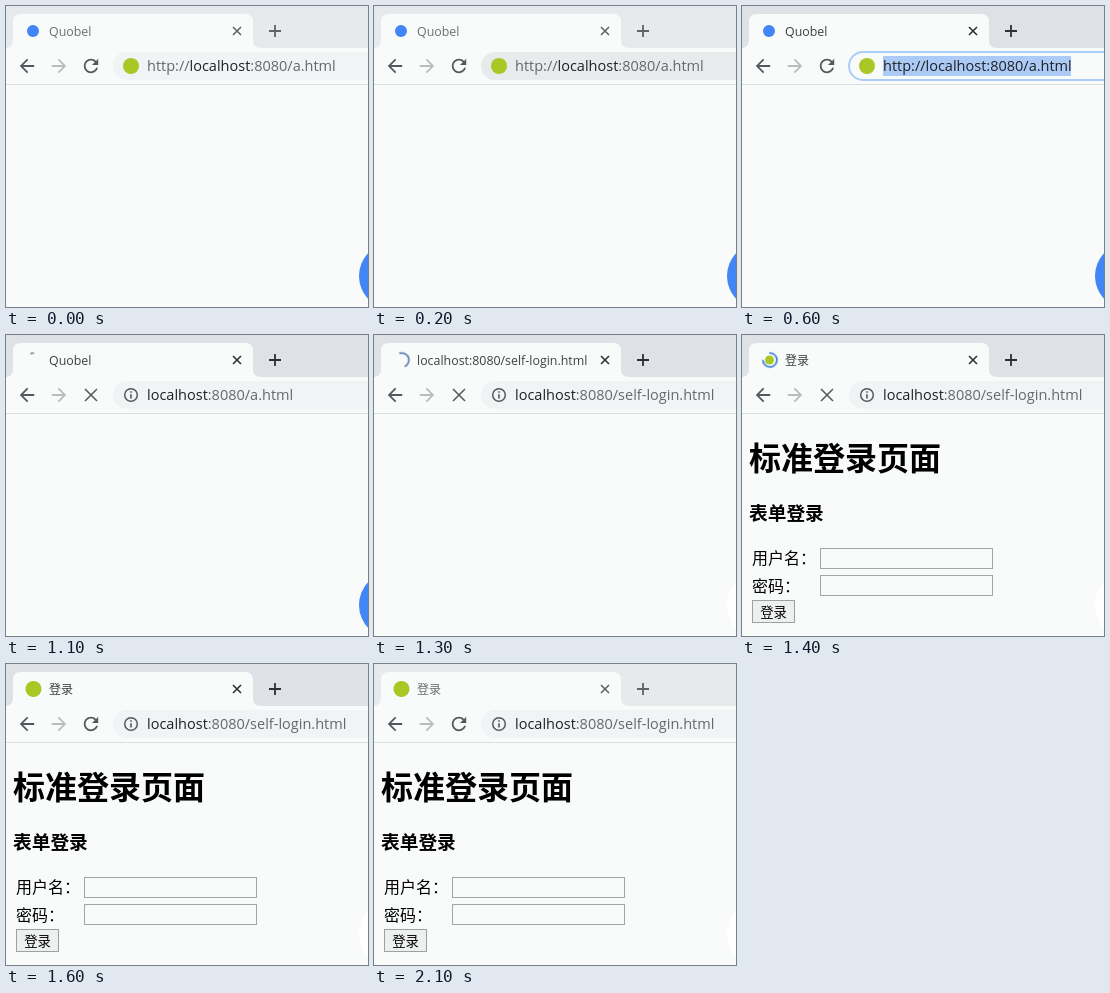
Animation, 362 px wide and 301 px high, one loop 2.9 s. Source, as an HTML page:

```html
<!DOCTYPE html>
<html lang="zh-CN">
<head>
<meta charset="utf-8">
<title>登录</title>
<style>
html, body { margin: 0; width: 100%; height: 100%; overflow: hidden; background: #f9fbfb; }
svg { display: block; width: 362px; height: 301px; }
text { font-family: "Open Sans", "Noto Sans CJK SC", "Noto Sans CJK", sans-serif; }
.url { font-size: 14.5px; fill: #64686c; }
.host { fill: #202124; }
.title { font-size: 12.4px; }
.page text { font-family: "Noto Sans CJK SC", "Noto Sans CJK", sans-serif; font-size: 16px; }
.page .h1 { font-size: 32px; font-weight: 700; }
.page .h3 { font-size: 18.72px; font-weight: 700; }
.page .btn { font-size: 13.333px; text-anchor: middle; }
.field { fill: #f9fbfb; stroke: #a3a5a5; }
.line { fill: none; stroke: #54585c; }

/* every change is a hard cut within one 2900 ms loop */
.strip, .ink, .cross, .pill, .blob, .spin, .leaf, .cut { animation: 2900ms step-end infinite; }
.strip { animation-name: strip; }
.ink { animation-name: ink; }
.cross { animation-name: cross; fill: none; }
.pill { animation-name: pill; stroke-width: 2; }
.blob { animation-name: blob; }
.leaf { animation-name: leaf; fill: #a9c825; }
.wait { animation-name: wait; stroke: #8b8f93; }
.load { animation-name: load; }
.to600 { animation-name: to600; }
.to1100 { animation-name: to1100; }
.to1300 { animation-name: to1300; }
.sel { animation-name: sel; }
.old { animation-name: old; }
.blank { animation-name: blank; }
.busy { animation-name: busy; }
.idle { animation-name: idle; }
.from1100 { animation-name: from1100; }
.from1300 { animation-name: from1300; }
.from1400 { animation-name: from1400; }
.spin { fill: none; stroke-width: 1.8; transform-origin: 28px 25px; }

@keyframes strip { 0%, 72.414%, 100% { fill: #e7eaed } 20.69% { fill: #dee1e6 } }
@keyframes ink { 0%, 72.414%, 100% { fill: #6b6f73 } 20.69% { fill: #3c4043 } }
@keyframes cross { 0%, 72.414%, 100% { stroke: #5f6368 } 20.69% { stroke: #2d3034 } }
@keyframes pill {
  0%, 37.931%, 100% { fill: #f1f3f4; stroke: transparent }
  6.897% { fill: #e8eaeb; stroke: transparent }
  20.69% { fill: #f9fbfb; stroke: #accdf6 }
}
@keyframes blob { 0% { fill: #4285f4 } 44.828%, 100% { fill: #fff } }
@keyframes leaf {
  0% { visibility: hidden; r: 4.5px }
  48.276% { visibility: visible; r: 4.5px }
  55.172%, 100% { visibility: visible; r: 8px }
}
@keyframes wait {
  0%, 44.828%, 100% { visibility: hidden; stroke-dasharray: 30 330 }
  37.931% { visibility: visible; stroke-dasharray: 30 330; transform: rotate(-120deg) }
  41.379% { visibility: visible; stroke-dasharray: 100 260; transform: rotate(-210deg) }
}
@keyframes load {
  0%, 55.172%, 100% { visibility: hidden; stroke: #6688b8 }
  44.828% { visibility: visible; stroke: #6688b8; stroke-dasharray: 180 180; transform: rotate(-112deg) }
  48.276% { visibility: visible; stroke: #4c87d6; stroke-dasharray: 275 85; transform: rotate(-95deg) }
  51.724% { visibility: visible; stroke: #4c87d6; stroke-dasharray: 270 90; transform: rotate(-30deg) }
}
@keyframes to600 { 0% { visibility: visible } 20.69%, 100% { visibility: hidden } }
@keyframes to1100 { 0% { visibility: visible } 37.931%, 100% { visibility: hidden } }
@keyframes to1300 { 0% { visibility: visible } 44.828%, 100% { visibility: hidden } }
@keyframes sel { 0%, 37.931%, 100% { visibility: hidden } 20.69% { visibility: visible } }
@keyframes old { 0%, 44.828%, 100% { visibility: hidden } 37.931% { visibility: visible } }
@keyframes blank { 0%, 48.276%, 100% { visibility: hidden } 44.828% { visibility: visible } }
@keyframes busy { 0%, 55.172%, 100% { visibility: hidden } 37.931% { visibility: visible } }
@keyframes idle { 0%, 55.172%, 100% { visibility: visible } 37.931% { visibility: hidden } }
@keyframes from1100 { 0% { visibility: hidden } 37.931%, 100% { visibility: visible } }
@keyframes from1300 { 0% { visibility: hidden } 44.828%, 100% { visibility: visible } }
@keyframes from1400 { 0% { visibility: hidden } 48.276%, 100% { visibility: visible } }
</style>
</head>
<body>
<svg viewBox="0 0 362 301">
  <defs>
    <path id="arrow" d="M20 11H7.83l5.59-5.59L12 4l-8 8 8 8 1.41-1.41L7.83 13H20z"/>
  </defs>
  <rect width="362" height="301" fill="#f9fbfb"/>

  <!-- tab strip -->
  <rect class="strip" width="362" height="42"/>
  <path d="M-1 42Q7 42 7 34V16Q7 8 15 8H239Q247 8 247 16V34Q247 42 255 42Z" fill="#f9fbfb"/>
  <circle class="cut to1100" cx="27" cy="25" r="6" fill="#4285f4"/>
  <circle class="leaf" cx="27.5" cy="25"/>
  <circle class="spin wait" cx="28" cy="25" r="7" pathLength="360"/>
  <circle class="spin load" cx="28" cy="25" r="7" pathLength="360"/>
  <g class="ink title">
    <text class="cut to1300" x="43" y="30">Quobel</text>
    <text class="cut blank" x="43" y="30">localhost:8080/self-login.html</text>
    <text class="cut from1400" x="43" y="29.6" font-size="12">登录</text>
  </g>
  <path class="cross" stroke-width="1.6" d="M227 21l8 8m0-8l-8 8"/>
  <path class="cross" stroke-width="1.8" d="M263 25h12M269 19v12"/>

  <!-- toolbar -->
  <use href="#arrow" transform="translate(10.2 49.2) scale(.9)" fill="#54585c"/>
  <use href="#arrow" transform="translate(63.8 49.2) scale(-.9 .9)" fill="#babcbe"/>
  <path class="cut idle" transform="translate(74.2 49.2) scale(.9)" fill="#54585c" d="M17.65 6.35C16.2 4.9 14.21 4 12 4c-4.42 0-7.99 3.58-7.99 8s3.57 8 7.99 8c3.73 0 6.84-2.55 7.73-6h-2.08c-.82 2.33-3.04 4-5.65 4-3.31 0-6-2.69-6-6s2.69-6 6-6c1.66 0 3.14.69 4.22 1.78L13 11h7V4z"/>
  <path class="cut busy line" stroke-width="1.5" d="M79 54l12 12m0-12l-12 12"/>
  <rect class="pill" x="107" y="46" width="300" height="28" rx="14"/>
  <circle class="cut to1100" cx="125" cy="60" r="8" fill="#a9c825"/>
  <g class="cut from1100">
    <circle class="line" cx="125" cy="60" r="6.3" stroke-width="1.5"/>
    <path class="line" stroke-width="1.6" d="M125 56.2v1.6M125 59.2v4.4"/>
  </g>
  <rect class="cut sel" x="141" y="50" width="188" height="20" fill="#abcaf6"/>
  <g class="url">
    <text class="cut to600" x="141" y="65">http://<tspan class="host">localhost</tspan>:8080/a.html</text>
    <text class="cut sel host" x="141" y="65">http://localhost:8080/a.html</text>
    <text class="cut old" x="141" y="65"><tspan class="host">localhost</tspan>:8080/a.html</text>
    <text class="cut from1300" x="141" y="65"><tspan class="host">localhost</tspan>:8080/self-login.html</text>
  </g>
  <rect y="78" width="362" height="1" fill="#dcdfe1"/>

  <!-- page -->
  <circle class="blob" cx="386.5" cy="270" r="33.5"/>
  <g class="page cut from1400">
    <text class="h1" x="7" y="135">标准登录页面</text>
    <text class="h3" x="7" y="184.7">表单登录</text>
    <text x="10" y="229.3">用户名：</text>
    <text x="10" y="256.5">密码：</text>
    <rect class="field" x="78.5" y="213.5" width="172" height="20"/>
    <rect class="field" x="78.5" y="240.5" width="172" height="20"/>
    <rect x="10.5" y="265.5" width="42" height="22" fill="#eef0f0" stroke="#9fa1a1"/>
    <text class="btn" x="31.5" y="281.7">登录</text>
  </g>
</svg>
</body>
</html>
```
